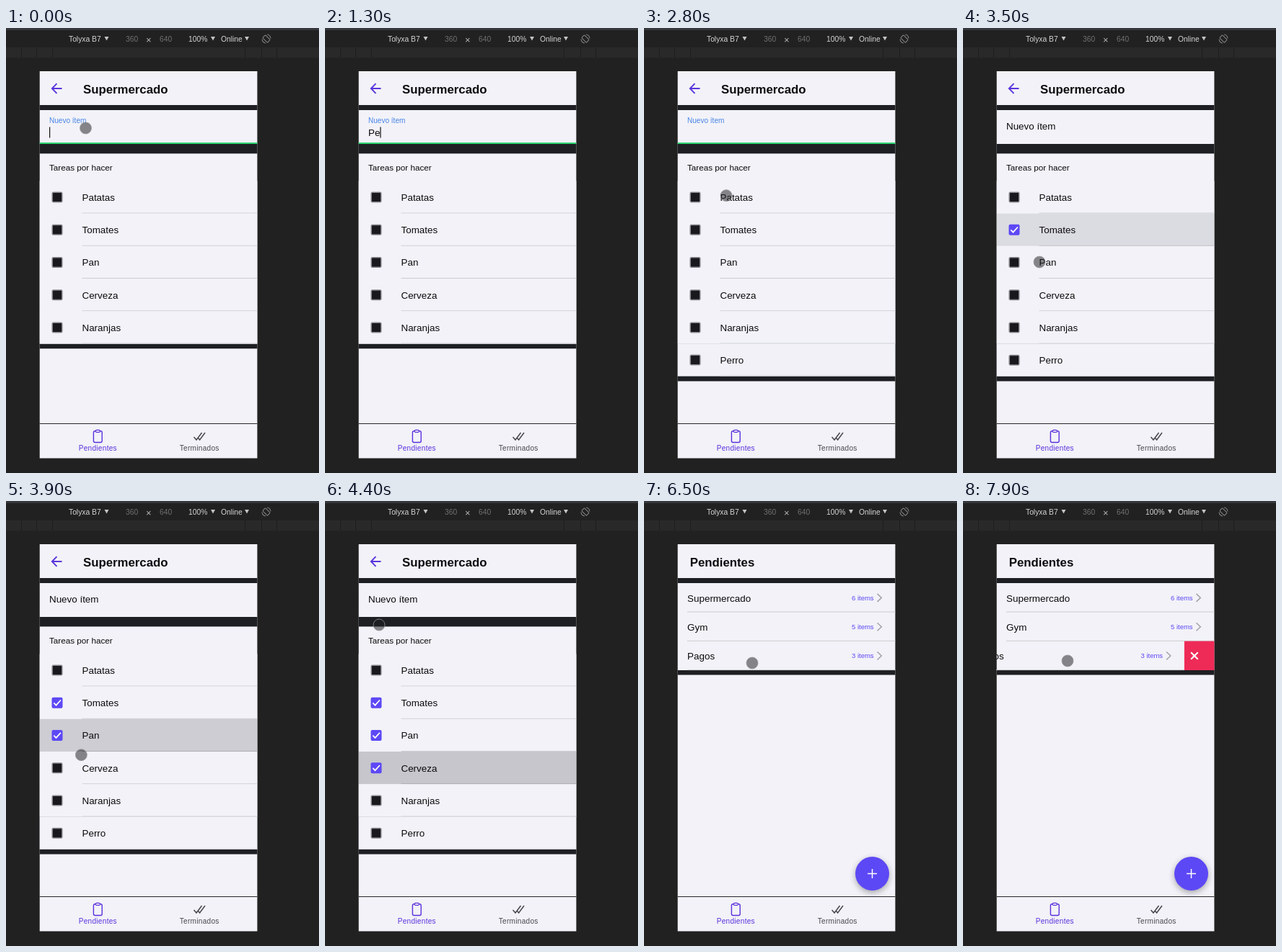
Write an HTML page with a canvas that moves like this. It is 434 px wide and 618 px high and loops after 8000 ms.

```html
<!DOCTYPE html>
<html lang="es">
<head>
<meta charset="utf-8">
<title>Lista de tareas</title>
<style>
html, body { margin: 0; width: 100%; height: 100%; overflow: hidden; background: #212121; }
canvas { display: block; width: 434px; height: 618px; }
</style>
</head>
<body>
<canvas id="stage"></canvas>
<script>
const W = 434, H = 618, LOOP = 8000, STEP = 100;
const LEFT = 46.7, RIGHT = 348.4, TOP = 60, ROW = 45.25, LIST_Y = 212.3;
const PAPER = '#f2f2f8', GAP = '#1d1f23', PURPLE = '#5d48f5', INK = '#0c0c0e';
const FONT = '"Liberation Sans", Arial, sans-serif';

const dpr = window.devicePixelRatio || 1;
function setup(c) {
  c.width = W * dpr;
  c.height = H * dpr;
  const ctx = c.getContext('2d');
  ctx.scale(dpr, dpr);
  return ctx;
}
const stage = document.getElementById('stage');
const layer = document.createElement('canvas');
const screen = setup(stage), sheet = setup(layer);
let g = screen;

const clamp = v => Math.max(0, Math.min(1, v));
const lerp = (a, b, k) => a + (b - a) * k;
const ramp = (t, a, b) => clamp((t - a) / (b - a));

// Value of a cubic-bezier timing curve at x.
function bezier(x, x1, y1, x2, y2) {
  const at = (s, a, b) => 3 * a * s * (1 - s) ** 2 + 3 * b * s * s * (1 - s) + s ** 3;
  let lo = 0, hi = 1;
  for (let i = 0; i < 24; i++) {
    const mid = (lo + hi) / 2;
    if (at(mid, x1, x2) < x) lo = mid; else hi = mid;
  }
  return at(lo, y1, y2);
}

// Interpolates keys of the form [time, ...values].
function track(keys, t) {
  let i = 0;
  while (i < keys.length - 2 && t >= keys[i + 1][0]) i++;
  const a = keys[i], b = keys[i + 1], k = ramp(t, a[0], b[0]);
  return a.slice(1).map((v, n) => lerp(v, b[n + 1], k));
}

function rect(x, y, w, h, color) {
  g.fillStyle = color;
  g.fillRect(x, y, w, h);
}

function text(s, x, cy, size, color = INK, opt = {}) {
  g.font = `${opt.bold ? 'bold ' : ''}${size}px ${FONT}`;
  g.letterSpacing = opt.space || '0px';
  g.textAlign = opt.align || 'left';
  g.fillStyle = color;
  g.fillText(s, x, cy + size * 0.355);
  return g.measureText(s).width;
}

function lines(color, width, ...paths) {
  g.strokeStyle = color;
  g.lineWidth = width;
  g.beginPath();
  for (const p of paths)
    for (let i = 0; i < p.length; i += 2) i ? g.lineTo(p[i], p[i + 1]) : g.moveTo(p[0], p[1]);
  g.stroke();
}

function disc(x, y, r, color) {
  g.fillStyle = color;
  g.beginPath();
  g.arc(x, y, r, 0, 7);
  g.fill();
}

function box(x, y, w, h, r) {
  g.beginPath();
  g.roundRect(x, y, w, h, r);
}

function triangle(x, y) {
  g.fillStyle = '#c4c4c4';
  g.beginPath();
  g.moveTo(x - 3, y - 3);
  g.lineTo(x + 3, y - 3);
  g.lineTo(x, y + 2.5);
  g.fill();
}

function toolbar() {
  rect(0, 0, W, H, '#212121');
  rect(0, 0, W, 3, '#37383e');
  rect(0, 27, W, 14.5, '#292929');
  for (const x of [21, 42, 64, 331, 354, 375]) rect(x, 27, 1, 14.5, '#1e1e1e');
  const light = '#d4d4d4', dim = '#707070';
  text('Tolyxa B7', 87, 15, 10.3, light);
  text('360', 166, 15, 10.3, dim);
  text('×', 194, 16.2, 13, '#b8b8b8');
  text('640', 213, 15, 10.3, dim);
  text('100%', 253, 15, 10.3, light);
  text('Online', 298, 15, 10.3, light);
  [139.5, 287, 334].forEach(x => triangle(x, 15));
  g.save();
  g.translate(361, 15);
  g.rotate(-Math.PI / 4);
  g.strokeStyle = '#858585';
  g.lineWidth = 1;
  box(-2.7, -4.7, 5.4, 9.4, 1);
  g.stroke();
  for (const a of [0, Math.PI]) {
    g.beginPath();
    g.arc(0, 0, 6, a - 0.6, a + 0.7);
    g.stroke();
  }
  g.restore();
}

function tabs() {
  rect(LEFT, 549, RIGHT - LEFT, 48.5, PAPER);
  rect(LEFT, 549, RIGHT - LEFT, 1, '#26262a');
  const violet = '#5a30dc', gray = '#47474e';
  g.strokeStyle = violet;
  g.lineWidth = 1.4;
  box(121.4, 559.7, 11.8, 15.8, 2);
  g.stroke();
  g.fillStyle = PAPER;
  g.lineWidth = 1.2;
  box(124.3, 558.4, 6, 3, 1.2);
  g.fill();
  g.stroke();
  lines(gray, 1.5, [260.5, 568, 264, 572, 271.5, 562], [266, 568.8, 268.6, 572, 276, 562]);
  text('Pendientes', 127.3, 583.5, 10.05, violet, { align: 'center', space: '0.3px' });
  text('Terminados', 268.2, 583.5, 10.05, gray, { align: 'center', space: '0.3px' });
}

function gap(y, h) { rect(LEFT, y, RIGHT - LEFT, h, GAP); }

function checkbox(cy, on) {
  if (on) {
    g.fillStyle = PURPLE;
    box(63.5, cy - 7.5, 15, 15, 2);
    g.fill();
    lines('#fff', 1.7, [66.3, cy + 0.3, 69.5, cy + 3.5, 75.9, cy - 3.7]);
  } else {
    g.fillStyle = '#18181d';
    g.strokeStyle = '#86868c';
    g.lineWidth = 1.5;
    box(64.2, cy - 6.8, 13.6, 13.6, 1.5);
    g.fill();
    g.stroke();
  }
}

const tasks = ['Patatas', 'Tomates', 'Pan', 'Cerveza', 'Naranjas', 'Perro'];
const taps = { Tomates: 3150, Pan: 3650, Cerveza: 4200 };
const letters = [1000, 1300, 1500, 1700, 1900];
const BLUR = 3150, ADDED = 2050;

function taskRow(name, y, t) {
  const tap = taps[name] ?? Infinity, age = t - tap;
  rect(LEFT, y, RIGHT - LEFT, ROW, PAPER);
  rect(105.5, y + ROW - 1, RIGHT - 105.5, 1, '#cbcbd0');
  if (age > 0 && age < 500) {
    const a = 0.19 * ramp(age, 0, 130) * (1 - ramp(age, 200, 500));
    rect(LEFT, y, RIGHT - LEFT, ROW, `rgba(10,10,14,${a})`);
  }
  const cy = y + ROW / 2;
  checkbox(cy, age >= 50);
  text(name, 105.5, cy + 0.3, 13.4);
}

function inputField(t) {
  const k = ramp(t, BLUR, 3300);
  const mix = (a, b) => Math.round(lerp(a, b, k));
  const color = `rgb(${mix(72, 12)},${mix(132, 12)},${mix(230, 14)})`;
  text('Nuevo ítem', 60, lerp(128, 136.3, k), lerp(10.05, 13.4, k), color);
  if (t >= BLUR) return;
  rect(LEFT, 159, RIGHT - LEFT, 2, '#2fd673');
  const typed = t < ADDED ? 'Perro'.slice(0, letters.filter(l => t >= l).length) : '';
  const w = typed ? text(typed, 60, 145, 13.4) : 0;
  const hidden = (t >= 500 && t < 1000) || t >= 2600;
  if (!hidden) rect(60 + w, 137.5, 1.2, 15, '#111');
}

function detailPage(t) {
  const added = t >= ADDED;
  rect(LEFT, TOP, RIGHT - LEFT, 489, PAPER);
  gap(107, 7);
  gap(161, 13.4);
  if (t >= 4900) disc(70, 84, 18 * ramp(t, 4800, 5100), 'rgba(93,72,245,.15)');
  lines('#5a35dc', 1.9, [77.5, 84, 64, 84], [70.5, 77.2, 63.8, 84, 70.5, 90.8]);
  text('Supermercado', 107, 85, 16.8, INK, { bold: true });
  inputField(t);
  text('Tareas por hacer', 60, 194, 11.7);
  const bottom = LIST_Y + ROW * 5;
  gap(bottom, added ? 490.5 - bottom : 6.7);
  tasks.slice(0, 5).forEach((name, i) => taskRow(name, LIST_Y + i * ROW, t));
  if (added) {
    const k = bezier(ramp(t, 1880, 2880), 0.25, 0.1, 0.25, 1);
    g.globalAlpha = k;
    taskRow('Perro', bottom - ROW * (1 - k), t);
    g.globalAlpha = 1;
  }
}

const swipe = [[7400, 0], [7600, 20], [7700, 48], [7800, 45], [7900, 41.5], [8000, 41.5]];

function homePage(t) {
  rect(LEFT, TOP, RIGHT - LEFT, 489, PAPER);
  text('Pendientes', 63.7, 85, 16.8, INK, { bold: true });
  gap(107, 7);
  gap(235, 6.5);
  const slide = track(swipe, t)[0];
  [['Supermercado', 6], ['Gym', 5], ['Pagos', 3]].forEach(([name, n], i) => {
    const y = 114 + i * 40.3, cy = y + 20.4, dx = i === 2 ? slide : 0;
    text(name, 60 - dx, cy + 0.4, 13.45);
    text(n + ' items', 288 - dx, cy, 9.5, PURPLE);
    lines('#a2a2a8', 1.5, [323.5 - dx, cy - 5.5, 329.3 - dx, cy, 323.5 - dx, cy + 5.5]);
    rect(60 - dx, y + 39.5, RIGHT - 60, 1, '#cbcbd0');
    if (dx) {
      rect(RIGHT - dx, y, dx, 40.4, '#ee2a57');
      const x = RIGHT - dx + 14;
      lines('#fff', 2.1, [x - 4.8, cy - 4.8, x + 4.8, cy + 4.8], [x + 4.8, cy - 4.8, x - 4.8, cy + 4.8]);
    }
  });
  g.save();
  g.shadowColor = 'rgba(0,0,0,.32)';
  g.shadowBlur = 9 * dpr;
  g.shadowOffsetY = 3 * dpr;
  disc(316.5, 517.5, 23.5, PURPLE);
  g.restore();
  lines('#fff', 1.5, [310, 517.5, 323, 517.5], [316.5, 511, 316.5, 524]);
}

const path = [
  [2600, 111, 145], [2750, 112, 205], [2900, 118, 288], [3000, 118, 291], [3200, 118, 291],
  [3500, 106, 325], [3700, 105, 326], [4000, 104, 366], [4200, 102, 369], [4400, 75, 172],
  [4700, 62, 89], [4900, 62, 87], [5300, 62, 87], [5800, 200, 98], [6000, 196, 140],
  [6300, 160, 238], [6500, 150, 225], [6800, 152, 222], [7100, 165, 140], [7400, 188, 222],
  [7600, 166, 223], [7700, 142, 223], [7900, 145, 222], [8000, 145, 222]
];

function pointer(t) {
  if (t >= 1000 && t < 2600) return;
  const [x, y] = t < 1000 ? [110.5, 139] : track(path, t);
  disc(x, y, 8, 'rgba(30,30,32,.52)');
  g.strokeStyle = 'rgba(150,150,152,.75)';
  g.lineWidth = 1;
  g.beginPath();
  g.arc(x, y, 8, 0, 7);
  g.stroke();
}

function draw(t) {
  g = screen;
  toolbar();
  g.save();
  g.beginPath();
  g.rect(Math.floor(LEFT), TOP, Math.ceil(RIGHT) - Math.floor(LEFT), 538);
  g.clip();
  const leave = bezier(ramp(t, 5070, 5270), 0.47, 0, 0.745, 0.715);
  if (leave > 0) homePage(t);
  if (leave < 1) {
    g = sheet;
    g.clearRect(0, 0, W, H);
    detailPage(t);
    g = screen;
    g.globalAlpha = 1 - leave;
    g.drawImage(layer, 0, 34 * leave, W, H);
    g.globalAlpha = 1;
  }
  tabs();
  g.restore();
  pointer(t);
}

const start = performance.now();
function frame() {
  const t = (performance.now() - start) % LOOP;
  draw(Math.floor(t / STEP) * STEP);
  requestAnimationFrame(frame);
}
frame();
</script>
</body>
</html>
```
